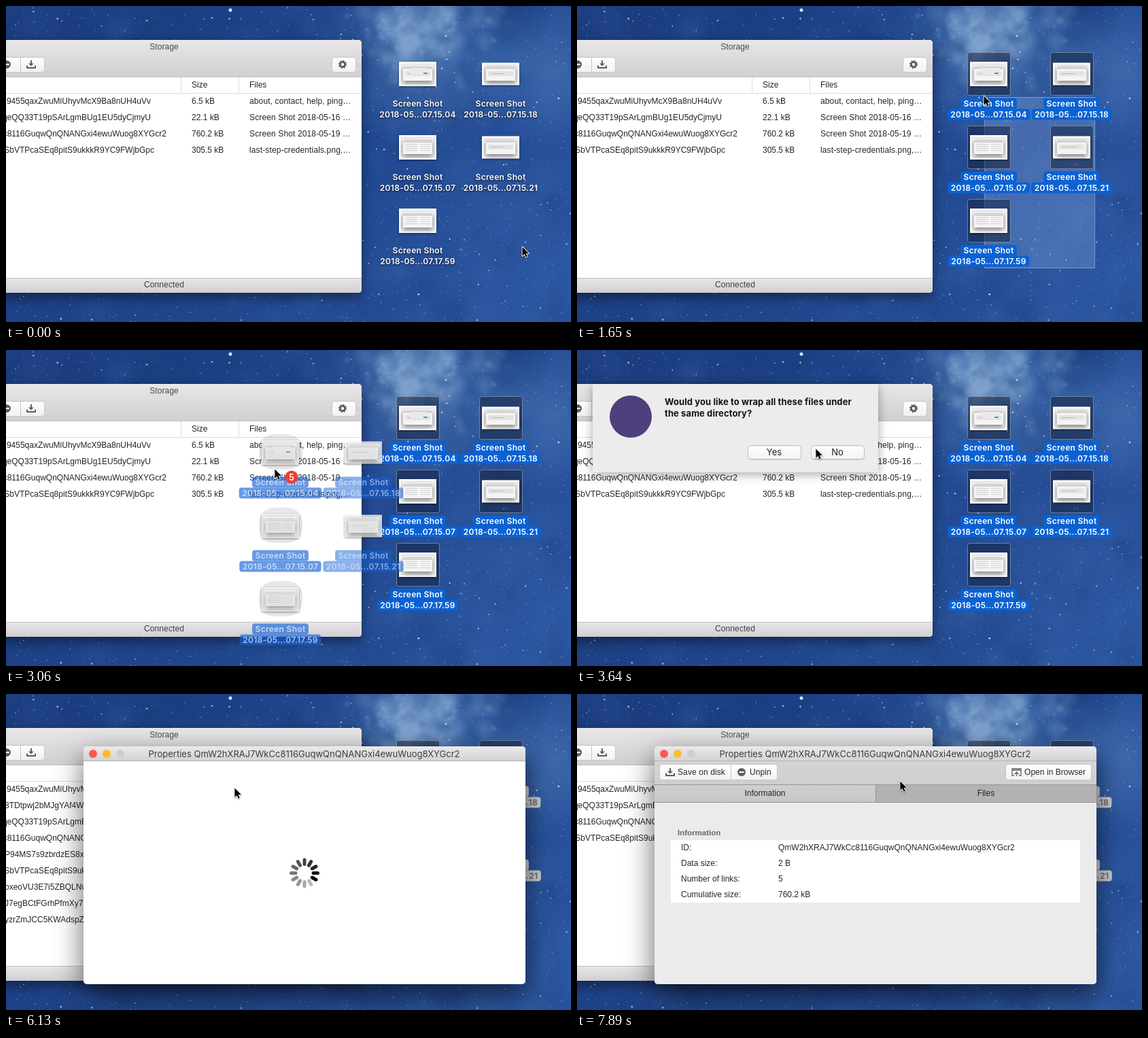
Write an HTML page with a canvas that moves like this. It is 831 by 465 pixels and loops after 8 s.

```html
<!DOCTYPE html>
<html lang="en">
<head>
<meta charset="utf-8">
<title>Storage</title>
<style>
html, body { margin: 0; width: 100%; height: 100%; overflow: hidden; background: #1f4389; }
canvas { display: block; width: 100vw; height: 100vh; }
</style>
</head>
<body>
<canvas id="stage" width="831" height="465"></canvas>
<script>
const W = 831, H = 465, LOOP = 8000, STEP = 117.7;
const SANS = '"Liberation Sans", Arial, sans-serif', UI = 'Inter, sans-serif';
const INK = '#262626', ICON = '#5f5f60';
let g = document.getElementById('stage').getContext('2d');

// [step, x, y] of the pointer tip
const PATH = [
  [3, 758, 354], [6, 761, 385], [7, 761, 385], [14, 597, 132], [16, 596, 118],
  [19, 596, 118], [23, 433, 152], [26, 394, 175], [31, 350, 145], [33, 312, 149],
  [37, 293, 151], [41, 293, 151], [48, 335, 138], [52, 335, 138], [58, 468, 123],
  [66, 468, 123], [67, 474, 128]
];
const ICONS = [
  [606, 100, '04'], [728, 100, '18'], [606, 208, '07'], [728, 208, '21'], [606, 316, '59']
];
const HASH = 'QmW2hXRAJ7WkCc8116GuqwQnQNANGxi4ewuWuog8XYGcr2';
const ROWS = [
  ['9455qaxZwuMiUhyvMcX9Ba8nUH4uVv', 213, '6.5 kB', 'about, contact, help, ping…'],
  ['qeQQ33T19pSArLgmBUg1EU5dyCjmyU', 213, '22.1 kB', 'Screen Shot 2018-05-16 …'],
  [HASH, 236, '760.2 kB', 'Screen Shot 2018-05-19 …'],
  ['SbVTPcaSEq8pitS9ukkkR9YC9FWjbGpc', 218, '305.5 kB', 'last-step-credentials.png,…']
];
const added = (id, size) => [id, 0, size, ''];
const MORE_ROWS = [
  ROWS[0], added('8TDtpwj2bMJgYAf4Wq7LdnRs2VhKe', '148.2 kB'), ROWS[1], ROWS[2],
  added('P94MS7s9zbrdzES8xTq3GnVb5KcJw', '152.6 kB'), ROWS[3],
  added('oxeoVU3E7i5ZBQLNwD4rXh8sTfMpa', '157.1 kB'),
  added('J7egBCtFGrhPfmXy7HkW2nUqZs9Ld', '149.8 kB'),
  added('yzrZmJCC5KWAdspZ3vTgHb6RxNq8E', '151.4 kB')
];

function pointer(k) {
  let i = PATH.findIndex(p => p[0] >= k);
  if (i < 0) i = PATH.length - 1;
  const b = PATH[i], a = PATH[i - 1] || b;
  const u = b[0] > a[0] ? Math.min(1, (k - a[0]) / (b[0] - a[0])) : 1;
  return [a[1] + (b[1] - a[1]) * u, a[2] + (b[2] - a[2]) * u];
}

function text(s, x, y, color = INK, font = '12px ' + SANS, align = 'left', spacing = 0) {
  g.font = font;
  g.fillStyle = color;
  g.textAlign = align;
  g.letterSpacing = spacing + 'px';
  g.fillText(s, x, y);
}

function box(x, y, w, h, fill, r = 0, line) {
  g.beginPath();
  g.roundRect(x, y, w, h, r);
  if (fill) { g.fillStyle = fill; g.fill(); }
  if (line) { g.strokeStyle = line; g.lineWidth = 1; g.stroke(); }
}

function dot(x, y, r, fill) {
  g.beginPath();
  g.arc(x, y, r, 0, 7);
  g.fillStyle = fill;
  g.fill();
}

function shade(y0, y1, from, to) {
  const s = g.createLinearGradient(0, y0, 0, y1);
  s.addColorStop(0, from);
  s.addColorStop(1, to);
  return s;
}

function shadowed(blur, dy, alpha, draw) {
  g.save();
  g.shadowBlur = blur;
  g.shadowOffsetY = dy;
  g.shadowColor = `rgba(0,0,0,${alpha})`;
  draw();
  g.restore();
}

function lines(color, width, ...paths) {
  g.strokeStyle = color;
  g.lineWidth = width;
  g.beginPath();
  for (const p of paths)
    for (let i = 0; i < p.length; i += 2) g[i ? 'lineTo' : 'moveTo'](p[i], p[i + 1]);
  g.stroke();
}

function glow(x, y, r, rgb, alpha) {
  const s = g.createRadialGradient(x, y, 0, x, y, r);
  s.addColorStop(0, `rgba(${rgb},${alpha})`);
  s.addColorStop(1, `rgba(${rgb},0)`);
  g.fillStyle = s;
  g.fillRect(x - r, y - r, 2 * r, 2 * r);
}

function makeSky() {
  const sky = document.createElement('canvas'), main = g;
  sky.width = W;
  sky.height = H;
  g = sky.getContext('2d');
  let seed = 11;
  const rnd = () => (seed = (seed * 16807) % 2147483647) / 2147483647;
  const bell = () => rnd() + rnd() + rnd() - 1.5;
  const s = g.createLinearGradient(0, 0, W, H);
  s.addColorStop(0, '#1c3d80');
  s.addColorStop(.5, '#20468d');
  s.addColorStop(1, '#2a559f');
  g.fillStyle = s;
  g.fillRect(0, 0, W, H);
  glow(620, 50, 160, '110,155,205', .45);
  glow(600, 40, 80, '160,195,225', .4);
  glow(800, 95, 110, '95,140,200', .4);
  glow(720, 360, 190, '50,95,170', .35);
  glow(740, 0, 70, '15,45,105', .45);
  glow(230, 10, 160, '25,60,125', .5);
  for (let i = 0; i < 260; i++)
    glow(rnd() * W, rnd() * H, 8 + rnd() * 35, i % 2 ? '15,45,110' : '75,120,190', .11);
  for (let i = 0; i < 170; i++)
    glow(610 + bell() * 100, 45 + bell() * 60, 4 + rnd() * 18, i % 3 ? '170,203,232' : '25,65,130', .19);
  for (let i = 0; i < 2300; i++)
    dot(rnd() * W, rnd() * H, .35 + rnd() * .5, `rgba(180,208,245,${.15 + rnd() * .55})`);
  for (let i = 0; i < 170; i++)
    dot(rnd() * W, rnd() * H, .7 + rnd() * .7, `rgba(225,238,255,${.5 + rnd() * .5})`);
  dot(330, 6, 2.5, '#cfe6ff');
  g = main;
  return sky;
}
const sky = makeSky();

function thumb(x, y, id) {
  const list = id === '07' || id === '59', h = x < 700 ? 36 : 33;
  shadowed(3, 1, .5, () => box(x - 28, y - h / 2, 55, h, '#fcfcfc'));
  box(x - 24.5, y - h / 2 + 3.5, 48, h - 7, '#f7f7f7', 0, '#dcdcdc');
  shadowed(6, 3, .5, () => box(x - 22, y - 11, 43, 21, '#f4f4f4', 1));
  box(x - 22, y - 11, 43, 4, '#d4d4d4', 1);
  if (list) {
    for (let i = 0; i < 4; i++) {
      box(x - 19, y - 5 + i * 3, 18, 1, '#cfcfcf');
      box(x + 3, y - 5 + i * 3, 15, 1, '#d6d6d6');
    }
    return;
  }
  box(x - 19, y - 4, 37, 7, '#e3e3e3');
  box(x - 15, y - 1, 20, 1, '#bdbdbd');
  if (id === '04') {
    box(x - 11, y - 9, 26, 10, '#e9e9e9');
    box(x + 8, y - 2, 6, 2, '#4a90e2');
  }
}

function label(x, y, id, fill, color) {
  const font = '600 12px ' + UI, cx = x - .5;
  const names = ['Screen Shot', `2018-05...07.${id === '59' ? 17 : 15}.${id}`];
  names.forEach((s, i) => {
    const by = y + 48 + i * 16;
    const draw = () => text(s, cx, by, color, font, 'center', .3);
    if (!fill) return shadowed(3, 1, .8, draw);
    g.font = font;
    g.letterSpacing = '.3px';
    const w = g.measureText(s).width + 9;
    box(cx - w / 2, by - 12.5, w, 16, fill, 4);
    draw();
  });
}

function desktop(k) {
  const [px, py] = pointer(Math.min(k, 14));
  if (k >= 8 && k <= 14)
    box(px + 2.5, py + 2.5, 759 - px, 383 - py, 'rgba(150,185,240,.27)', 0, 'rgba(190,210,245,.5)');
  for (const [x, y, id] of ICONS) {
    const picked = k >= 8 && px < x + 40 && py < y + 66;
    if (picked) box(x - 31.5, y - 31.5, 63, 63, 'rgba(20,30,55,.5)', 3, 'rgba(160,165,175,.6)');
    thumb(x, y, id);
    if (!picked) label(x, y, id, null, '#fff');
    else if (k < 34) label(x, y, id, '#0a62d4', '#fff');
    else label(x, y, id, '#cbcbcd', '#66676a');
  }
}

function button(x, y, w, h) {
  box(x + .5, y + .5, w - 1, h - 1, shade(y, y + h, '#fefefe', '#f3f2f3'), 4, '#c6c4c6');
}

function download(x, y) {
  lines(ICON, 2, [x, y - 6, x, y]);
  g.fillStyle = ICON;
  g.beginPath();
  g.moveTo(x - 4, y - 1.5);
  g.lineTo(x + 4, y - 1.5);
  g.lineTo(x, y + 2.5);
  g.fill();
  lines(ICON, 2, [x - 6, y + 1.5, x - 6, y + 5, x + 6, y + 5, x + 6, y + 1.5]);
}

function minus(x, y) {
  dot(x, y, 6, ICON);
  box(x - 3.5, y - 1, 7, 2, '#fff');
}

function gear(x, y) {
  g.strokeStyle = ICON;
  for (const [r, w, dash] of [[3.6, 2.8, []], [5.2, 2, [2.04, 2.04]]]) {
    g.setLineDash(dash);
    g.lineWidth = w;
    g.beginPath();
    g.arc(x, y, r, 0, 2 * Math.PI);
    g.stroke();
  }
  g.setLineDash([]);
}

function storage(k) {
  const active = k >= 34 && k < 52;
  const corners = [0, 5, 5, 0];
  shadowed(active ? 34 : 18, active ? 14 : 7, active ? .65 : .45, () => box(-40, 50, 563, 372, '#fff', corners));
  g.save();
  box(-40, 50, 563, 372, '#fff', corners);
  g.clip();
  box(-40, 50, 563, 55, shade(50, 105, '#e8e6e8', '#d1cfd1'));
  box(-40, 50, 563, 1, '#f4f3f4');
  text('Storage', 232.5, 64, active ? '#3a3a3a' : '#4a4a4a', undefined, 'center', .1);
  if (active) dot(-4, 60, 6, '#28c840');
  button(-30, 75, 87, 23);
  box(21, 75, 1, 23, '#c8c6c8');
  minus(1, 86);
  download(37, 86);
  button(479, 75, 36, 23);
  gear(495, 86);
  box(-40, 104, 563, 1, '#c2c0c2');
  box(-40, 128, 563, 1, '#dcdcdc');
  box(257, 105, 1, 23, '#dcdcdc');
  box(342, 105, 1, 23, '#dcdcdc');
  text('Size', 273, 120);
  text('Files', 358, 120);
  (k >= 45 && k < 55 ? MORE_ROWS : ROWS).forEach(([id, end, size, files], i) => {
    const y = 144 + i * 24;
    text(id, end || -2, y, INK, undefined, end ? 'right' : 'left');
    text(size, 273, y);
    text(files, 358, y, INK, undefined, 'left', .13);
  });
  box(-40, 400, 563, 22, shade(400, 422, '#e8e6e8', '#d1cfd1'));
  box(-40, 400, 563, 1, '#c2c0c2');
  text('Connected', 232.5, 414, '#3f3f3f', undefined, 'center', .1);
  g.restore();
}

function dialog(alpha) {
  g.save();
  g.globalAlpha = alpha;
  shadowed(14, 3, .35, () => box(23, 50, 420, 130, '#ececec'));
  dot(79, 98, 31, '#4f3f7c');
  ['Would you like to wrap all these files under', 'the same directory?'].forEach((s, i) =>
    text(s, 129, 80.5 + i * 17, '#141414', '700 13px ' + UI, 'left', .1));
  [['Yes', 251], ['No', 344]].forEach(([s, x]) => {
    shadowed(1, 1, .1, () => button(x, 140, 79, 21));
    text(s, x + 39, 155, '#222', '13px ' + UI, 'center');
  });
  g.restore();
}

function ghosts(px, py) {
  g.save();
  g.translate(Math.round(px - 596), Math.round(py - 124));
  for (const [x, y, id] of ICONS) {
    const near = x < 700;
    g.globalAlpha = near ? .65 : .5;
    if (near) box(x - 32, y - 27, 64, 52, 'rgba(90,90,90,.22)', 22);
    label(x, y, id, '#1463d8', '#fff');
    g.globalAlpha = .8;
    thumb(x, y, id);
  }
  g.restore();
  dot(px + 26, py + 12, 9.5, '#f23b34');
  text('5', px + 26, py + 16.5, '#fff', '600 13px ' + UI, 'center');
}

function spinner(turn) {
  g.lineCap = 'round';
  for (let i = 0; i < 12; i++) {
    const a = (turn + 1 - i) * Math.PI / 6, c = Math.cos(a), s = Math.sin(a);
    lines(`rgba(0,0,0,${1 - i * .066})`, 5, [439 + 13 * c, 263.5 + 13 * s, 439 + 19.5 * c, 263.5 + 19.5 * s]);
  }
  g.lineCap = 'butt';
}

function details() {
  box(114, 99, 650, 328, '#ebebeb', [0, 0, 5, 5]);
  box(114, 99, 650, 35, shade(99, 134, '#d6d4d6', '#cfcdcf'));
  button(121, 103, 174, 24);
  box(226, 103, 1, 24, '#c8c6c8');
  download(137, 115);
  text('Save on disk', 148, 119, INK, undefined, 'left', .1);
  minus(242, 115);
  text('Unpin', 254, 119, INK, undefined, 'left', .1);
  button(630, 103, 127, 24);
  lines(ICON, 1.3, [643, 120, 640, 120, 640, 110, 653, 110, 653, 120, 650, 120],
    [640, 112, 653, 112], [646.5, 121, 646.5, 115], [643.5, 118, 646.5, 115, 649.5, 118]);
  text('Open in Browser', 658, 119, INK, undefined, 'left', .05);
  box(114, 133, 650, 27, '#989698');
  box(114, 134, 325, 25, shade(134, 159, '#d0ced0', '#c8c6c8'));
  box(440, 134, 324, 25, '#b3b1b3');
  text('Information', 276.5, 150, INK, undefined, 'center');
  text('Files', 601.5, 150, INK, undefined, 'center');
  text('Information', 148, 208, '#6a6a6a', 'bold 11.5px ' + SANS);
  box(138, 215, 602, 92, '#fff');
  [['ID:', HASH], ['Data size:', '2 B'], ['Number of links:', '5'], ['Cumulative size:', '760.2 kB']]
    .forEach(([name, value], i) => {
      text(name, 153, 230 + i * 23);
      text(value, 296, 230 + i * 23);
    });
}

function properties(k) {
  shadowed(42, 16, .6, () => box(114, 77, 650, 350, '#fff', 5));
  box(114, 77, 650, 22, shade(77, 99, '#ebe9eb', '#d3d1d3'), [5, 5, 0, 0]);
  box(114, 98, 650, 1, '#b4b2b4');
  ['#fc5753', '#fdbc2e', '#cfcdcf'].forEach((c, i) => dot(128 + i * 20, 88, 6, c));
  text('Properties ' + HASH, 438.5, 93, '#3c3c3c', '13px ' + UI, 'center');
  if (k >= 64) details();
  else spinner(Math.floor((Math.min(k, 61) - 52) * 1.41));
}

function arrow(x, y) {
  g.save();
  g.translate(x + 1, y);
  g.scale(.92, .92);
  g.beginPath();
  [[.5, .5], [.5, 15], [3.9, 11.9], [6.2, 17], [8.4, 16], [6.2, 11], [10.8, 11]]
    .forEach(p => g.lineTo(...p));
  g.closePath();
  g.lineJoin = 'round';
  g.strokeStyle = '#fff';
  g.lineWidth = 2;
  shadowed(2, 1, .4, () => g.stroke());
  g.fillStyle = '#000';
  g.fill();
  g.restore();
}

function frame(now) {
  const k = Math.min(67, Math.floor(now % LOOP / STEP + .15));
  const [px, py] = pointer(k);
  g.drawImage(sky, 0, 0);
  desktop(k);
  storage(k);
  if (k >= 28 && k < 40) dialog(k === 28 || k === 39 ? .5 : 1);
  if (k >= 20 && k < 27) ghosts(px, py);
  if (k >= 52) properties(k);
  arrow(px, py);
  requestAnimationFrame(frame);
}
requestAnimationFrame(frame);
</script>
</body>
</html>
```
